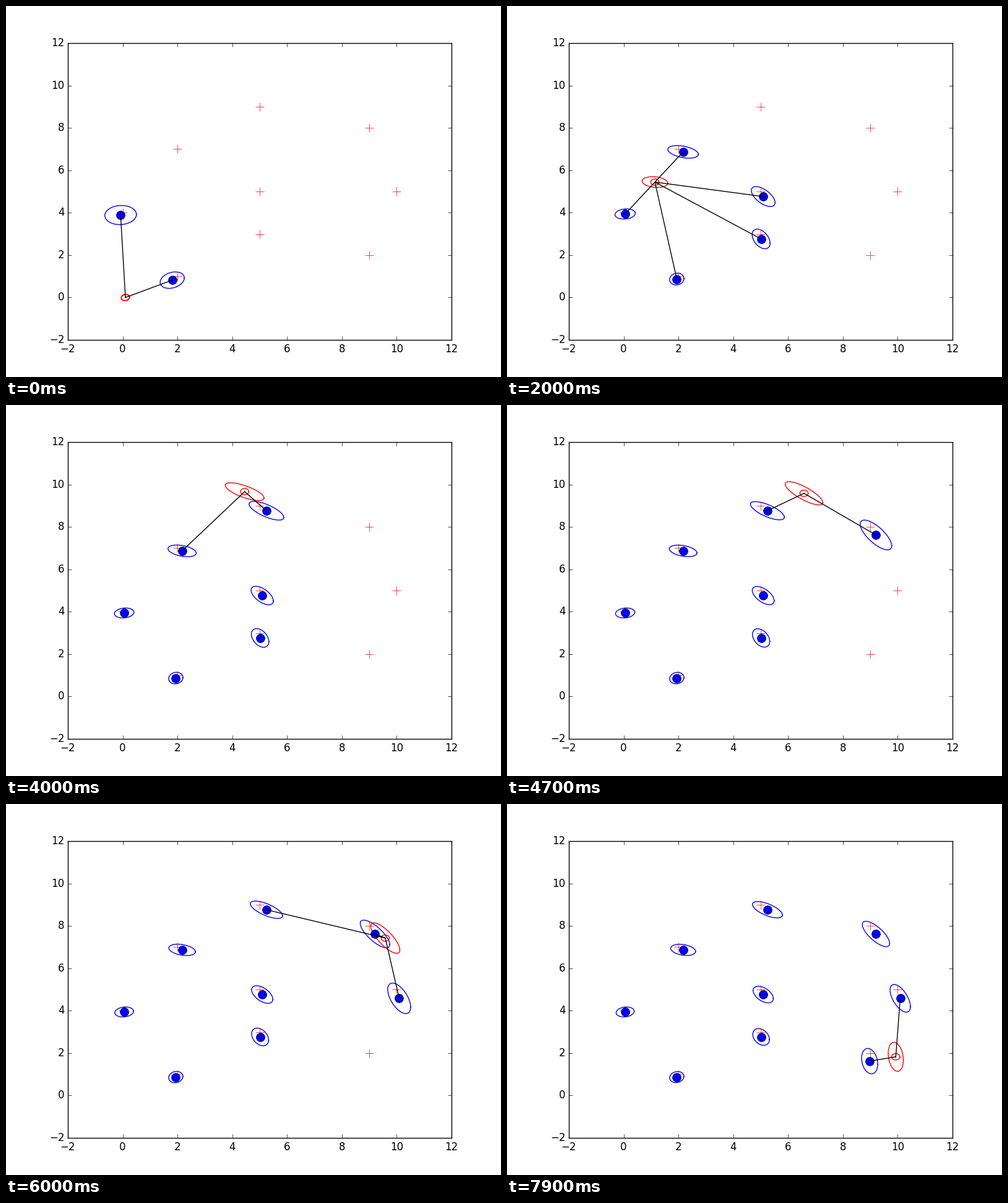
These frames come from a looping animation (800x600 px, 8000 ms). A matplotlib script:

```python
import numpy as np
import matplotlib.pyplot as plt
from matplotlib.animation import FuncAnimation

plt.style.use("classic")
plt.rcParams.update({"font.family": "DejaVu Sans", "figure.facecolor": "white"})

FRAMES, STEP = 80, 100
SPEED, SENSOR = 3.0, 4.93        # units per second, sight range
RANGE_VAR, BEARING_VAR = .153, .0125
BASE = np.array([[.06, .012], [.012, .05]])

marks = np.array([(2, 1), (0, 4), (5, 3), (5, 5), (2, 7),
                  (5, 9), (9, 8), (10, 5), (9, 2)], float)

# time, x, y, heading in degrees
keys = np.array([
    (0, .1, 0, 20), (.8, .947, 1.978, 110), (2, 1.139, 5.443, 80),
    (3.2, 2.342, 8.753, 45), (4.7, 6.581, 9.585, -8),
    (6, 9.584, 7.427, -66), (7.9, 9.93, 1.826, -100),
])


def robot(t):
    """Estimated position: cubic Hermite path at a steady speed."""
    i = min(int(np.searchsorted(keys[:, 0], t, "right")) - 1, len(keys) - 2)
    p, q = keys[i], keys[i + 1]
    dt = q[0] - p[0]
    u = (t - p[0]) / dt

    def vel(row):
        h = np.radians(row[3])
        return SPEED * dt * np.array([np.cos(h), np.sin(h)])

    return ((2 * u**3 - 3 * u**2 + 1) * p[1:3] + (3 * u**2 - 2 * u**3) * q[1:3]
            + (u**3 - 2 * u**2 + u) * vel(p) + (u**3 - u**2) * vel(q))


def drift(pos):
    """Map error: a small clockwise turn and shift."""
    x, y = pos
    return np.array([.0385 * y - .1, -.0355 * x - .06])


def map_cov(pos, t):
    """Shared uncertainty: a heading error seen over the lever arm, slowly shrinking."""
    x, y = pos
    lever = np.array([.96 * (y - .3), -1.05 * x])
    return BASE + (.0062 - .00036 * t) * np.outer(lever, lever)


def sensor_cov(rel):
    """Range and bearing noise of one sighting."""
    d = np.hypot(*rel)
    along = rel / d
    across = np.array([-along[1], along[0]])
    return (RANGE_VAR * np.outer(along, along)
            + BEARING_VAR * d**2 * np.outer(across, across))


def ellipse(center, cov):
    """Outline of a covariance, closed by a gap."""
    s = np.linspace(0, 2 * np.pi, 73)
    pts = np.linalg.cholesky(cov) @ [np.cos(s), np.sin(s)]
    return np.column_stack([pts + np.reshape(center, (2, 1)), [np.nan, np.nan]])


# Sightings for the whole loop
times = np.arange(FRAMES) * STEP / 1000
path = np.array([robot(t) for t in times])
truth = np.array([p - drift(p) for p in path])
seen = np.linalg.norm(truth[:, None] - marks, axis=2) < SENSOR
count = np.cumsum(seen, axis=0)
noise = [sensor_cov(m - truth[f]) for m, f in zip(marks, seen.argmax(axis=0))]

fig = plt.figure(figsize=(8, 6), dpi=100)
ax = fig.add_axes([.125, .1, .775, .8])
ax.set_xlim(-2, 12)
ax.set_ylim(-2, 12)

ax.plot(*marks.T, "r+", ms=10, mew=.5)
blobs, = ax.plot([], [], "b-", lw=1, zorder=1.5)
spread, = ax.plot([], [], "r-", lw=1, zorder=1.6)
body, = ax.plot([], [], "r-", lw=1, zorder=1.6)
dots, = ax.plot([], [], "bo", ms=10, mew=.5, mec="k")
rays, = ax.plot([], [], "k-", lw=1)


def draw(n):
    t, pos = times[n], path[n]
    known = np.flatnonzero(count[n])
    first_error = np.array([-.13, -.05])     # fades as sightings add up
    est = {k: marks[k] + drift(marks[k]) + first_error / count[n, k]**2
           for k in known}

    blobs.set_data(*np.hstack([
        ellipse(est[k], map_cov(marks[k], t) + noise[k] / count[n, k])
        for k in known]))
    dots.set_data(*np.array(list(est.values())).T)

    gap = (np.nan, np.nan)
    rays.set_data(*np.array([pt for k in known if seen[n, k]
                             for pt in (pos, est[k], gap)]).T)

    grown = 1.13 * (1 - .65 * np.exp(-3 * t))
    spread.set_data(*ellipse(pos, grown * map_cov(pos, t)))
    body.set_data(*ellipse(pos, .15**2 * np.eye(2)))
    return blobs, spread, body, dots, rays


anim = FuncAnimation(fig, draw, frames=FRAMES, interval=STEP,
                     repeat=True, repeat_delay=0, blit=False)
plt.show()
```
